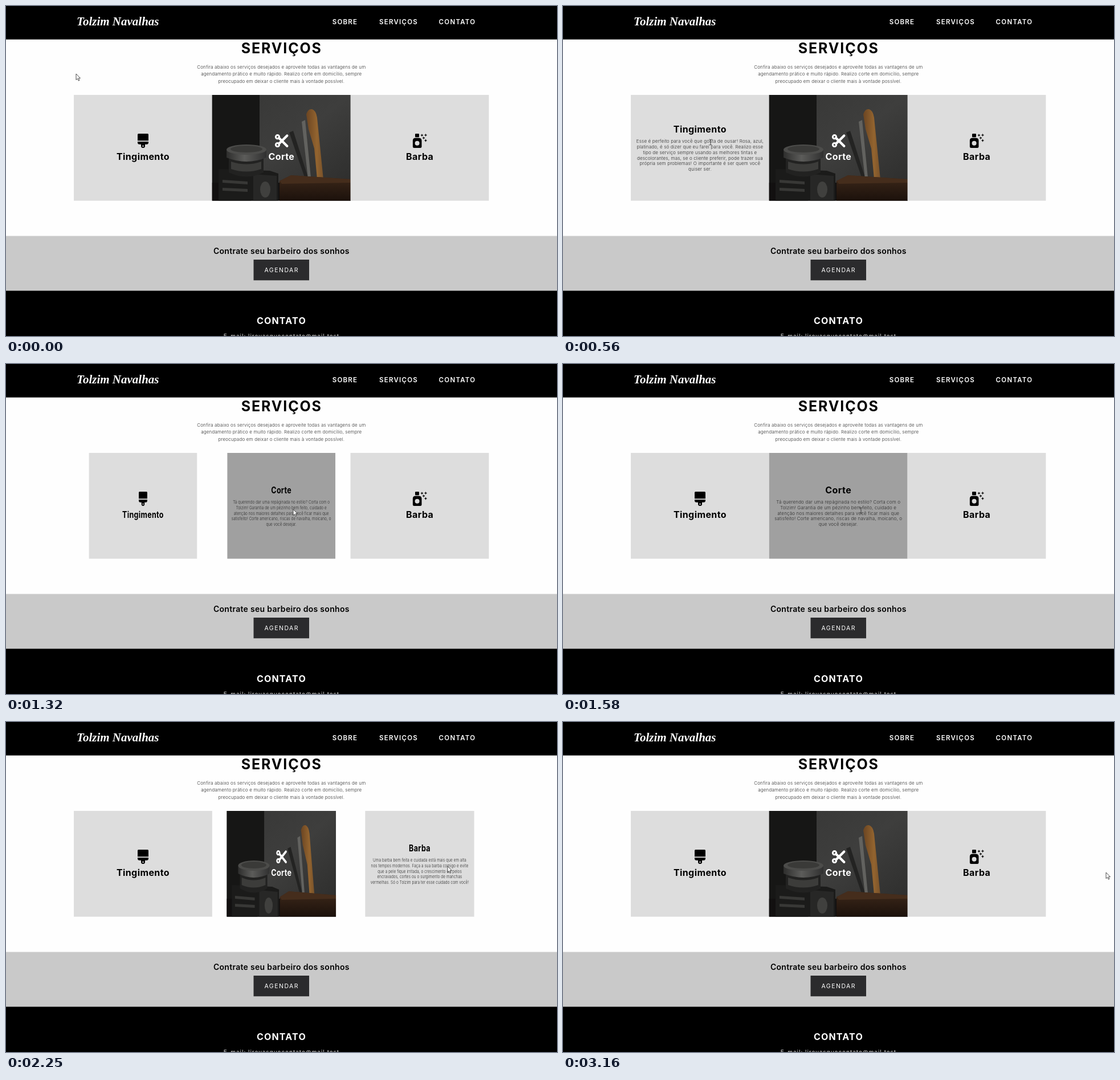
Animation of 967x579 px, one loop 3210 ms. Source, as an HTML page:

```html
<!DOCTYPE html>
<html lang="pt-BR">
<head>
<meta charset="utf-8">
<title>Serviços</title>
<style>
html, body { margin: 0; width: 100%; height: 100%; overflow: hidden; background: #fefefe; }
svg { display: block; }
#stage { width: 100vw; height: 100vh; }
text { font-family: Inter, sans-serif; text-anchor: middle; white-space: pre; }
.logo { font: italic 700 21px "Liberation Serif", serif; text-anchor: start; fill: #fff; }
.nav { font-size: 11.5px; font-weight: 600; letter-spacing: 1.25px; fill: #fff; }
.title { font-size: 25px; font-weight: 700; letter-spacing: 1.85px; }
.intro { font-size: 8px; font-weight: 300; letter-spacing: .19px; fill: #333; }
.name { font-size: 16px; font-weight: 700; letter-spacing: .42px; }
.body { font-size: 8px; font-weight: 300; letter-spacing: .17px; fill: #2c2c2c; }
.call { font-size: 14px; font-weight: 600; letter-spacing: .3px; }
.button { font-size: 10.5px; letter-spacing: 1.5px; fill: #fff; }
.contact { font-size: 16px; font-weight: 700; letter-spacing: 1.2px; fill: #fff; }
.mail { font-size: 10px; letter-spacing: .98px; fill: #ddd; }
</style>
</head>
<body>
<svg id="stage" viewBox="0 0 967 579" preserveAspectRatio="none">
  <defs>
    <linearGradient id="wall" x1="0" y1="0" x2="1" y2="1">
      <stop offset="0" stop-color="#363635"/>
      <stop offset=".5" stop-color="#3e3e3d"/>
      <stop offset="1" stop-color="#2b2b2a"/>
    </linearGradient>
    <linearGradient id="metal">
      <stop offset="0" stop-color="#2e2e2d"/>
      <stop offset=".45" stop-color="#5c5c5a"/>
      <stop offset="1" stop-color="#303030"/>
    </linearGradient>
    <linearGradient id="wood" x1="0" y1="0" x2="0" y2="1">
      <stop offset="0" stop-color="#3d281a"/>
      <stop offset="1" stop-color="#1b110b"/>
    </linearGradient>
    <linearGradient id="handle">
      <stop offset="0" stop-color="#6b4522"/>
      <stop offset=".6" stop-color="#93642f"/>
      <stop offset="1" stop-color="#75502a"/>
    </linearGradient>
    <path id="spark" d="M0-2.8L.8-.8 2.8 0 .8.8 0 2.8-.8.8-2.8 0-.8-.8z"/>
  </defs>

  <rect width="967" height="579" fill="#fefefe"/>
  <rect width="967" height="58.7" fill="#000"/>
  <text class="logo" x="124" y="34">Tolzim Navalhas</text>
  <text class="nav" x="595" y="31.8">SOBRE</text>
  <text class="nav" x="689" y="31.8">SERVIÇOS</text>
  <text class="nav" x="792" y="31.8">CONTATO</text>

  <text class="title" x="483.8" y="82.8">SERVIÇOS</text>
  <g id="intro"></g>

  <g class="card">
    <g class="front">
      <rect x="119" y="156" width="242.8" height="185.6" fill="#ddd"/>
      <path d="M232.5 224h16q1.5 0 1.5 1.5v10.7h-19v-10.7q0-1.5 1.5-1.5zM231 238h19v1.5q0 3.3-3.3 3.3h-2.7v2.7a3.5 3.5 0 0 1-7 0v-2.7h-2.7q-3.3 0-3.3-3.3z"/>
      <circle cx="240.5" cy="245.8" r="1.2" fill="#ddd"/>
      <text class="name" x="240.5" y="270">Tingimento</text>
    </g>
    <g class="back"></g>
  </g>

  <g class="card">
    <g class="front">
      <svg x="361.8" y="156" width="243.2" height="185.6" viewBox="361.8 156 243.2 185.6">
        <rect x="361" y="156" width="244" height="186" fill="url(#wall)"/>
        <path d="M361 156H445V250L430 342H361z" fill="#161615"/>
        <path d="M361 310H605V342H361z" fill="#121010"/>
        <path d="M373 286L463 289 478 294V342H373z" fill="#1b1b1a"/>
        <path d="M434 295L475 298V342H434z" fill="#272726"/>
        <path d="M380 305l44 3v5l-44-3zM380 319l44 2v5l-44-2z" fill="#383836"/>
        <ellipse cx="455" cy="322" rx="9" ry="14" fill="#40403e"/>
        <path d="M391 263H452V292Q422 307 391 292z" fill="#222221"/>
        <path d="M395 273q27 9 53 0v13q-26 9-53 0z" fill="#3c3c3a"/>
        <path d="M387 252V266Q422 280 457 266V252z" fill="url(#metal)"/>
        <ellipse cx="422" cy="252" rx="35" ry="9" fill="#4c4c4a"/>
        <ellipse cx="422" cy="251" rx="28" ry="6" fill="#3a3a38"/>
        <path d="M497 222L504 219 533 310 528 312z" fill="#232322"/>
        <path d="M519 203L525 200 536 311 531 312z" fill="#62625f"/>
        <path d="M527 190Q530 180 537 181 544 183 546 196L551 245 558 314Q553 319 547 314L541 250 531 216z" fill="url(#handle)"/>
        <path d="M480 307L500 297 605 304V342H480z" fill="url(#wood)"/>
        <path d="M480 307L500 297 605 304V310L484 312z" fill="#452d1c"/>
      </svg>
      <g fill="none" stroke="#fff">
        <circle cx="476.5" cy="229.7" r="3.1" stroke-width="3"/>
        <circle cx="476.5" cy="243.5" r="3.1" stroke-width="3"/>
        <path d="M479 231.5L493.3 245.7M479 241.7L493.3 227.5" stroke-width="4.3" stroke-linecap="round"/>
      </g>
      <text class="name" x="483.3" y="270" fill="#fff">Corte</text>
    </g>
    <g class="back"></g>
  </g>

  <g class="card">
    <g class="front">
      <rect x="604.6" y="156" width="242.8" height="185.6" fill="#ddd"/>
      <rect x="718" y="224" width="7" height="6.3" rx="1.2"/>
      <path d="M718.5 231.5h6q5 0 5 5v10.2q0 2.3-2.3 2.3h-11q-2.3 0-2.3-2.3v-10.2q0-5 4.6-5z"/>
      <circle cx="721.6" cy="240.7" r="4" fill="#ddd"/>
      <use href="#spark" x="730" y="226.8"/>
      <use href="#spark" x="736.5" y="226.5"/>
      <use href="#spark" x="733" y="231.5"/>
      <use href="#spark" x="736.5" y="236"/>
      <text class="name" x="726.2" y="270">Barba</text>
    </g>
    <g class="back"></g>
  </g>

  <rect y="403.5" width="967" height="97" fill="#c9c9c9"/>
  <text class="call" x="483.3" y="435">Contrate seu barbeiro dos sonhos</text>
  <rect x="434.5" y="445" width="97.5" height="36.3" fill="#2b2b2d"/>
  <text class="button" x="483.8" y="466.7">AGENDAR</text>
  <rect y="499.6" width="967" height="79.4" fill="#000"/>
  <text class="contact" x="483.4" y="558">CONTATO</text>
  <text class="mail" x="483.4" y="583">E-mail: lirovasquecontato@mail.test</text>

  <g id="pointer">
    <path id="arrow" d="M0 0V10.6L2.5 8.4 4.2 12.2 5.9 11.4 4.3 7.7H7.4z" fill="#fff" stroke="#222" stroke-width=".8"/>
    <path id="beam" d="M-2.5-5Q0-5 0-4V4Q0 5-2.5 5M2.5-5Q0-5 0-4M0 4Q0 5 2.5 5" fill="none" stroke="#333" stroke-width=".9"/>
  </g>
</svg>

<script>
const LOOP = 3210, FLIP = 300;

// The picture only refreshes at these times (ms).
const TICKS = [0, 70, 140, 210, 280, 350, 420, 490, 560,
  960, 1030, 1100, 1170, 1240, 1300, 1370, 1440,
  1860, 1930, 1990, 2060, 2120, 2200, 2260, 2320,
  2460, 2530, 2600, 2670, 2740, 2810, 2880, 2950, 3020, 3090, 3160];

// Pointer path: time, x, y
const PATH = [[0, 123, 119], [70, 128, 123], [250, 178, 157], [420, 246, 224],
  [560, 259, 239], [890, 259, 239], [1030, 300, 241], [1155, 405, 243],
  [1170, 429, 244], [1300, 504, 255], [1440, 523, 257], [1790, 523, 257],
  [1930, 555, 255], [2054, 680, 250], [2120, 751, 249], [2200, 775, 253],
  [2320, 788, 256], [2460, 788, 256], [2740, 795, 256], [2810, 858, 259],
  [2950, 936, 264], [3160, 953, 264]];

// Spans in which the pointer rests over text
const BEAM = [[490, 1100], [1370, 1990], [2260, 2810]];

const CARDS = [
  { x: 240.4, on: 250, off: 1155, fill: '#ddd', name: 'Tingimento', top: 222, lines: [
    'Esse é perfeito para você que gosta de ousar! Rosa, azul,',
    'platinado, é só dizer que eu farei para você. Realizo esse',
    'tipo de serviço sempre usando as melhores tintas e',
    'descolorantes, mas, se o cliente preferir, pode trazer sua',
    'própria sem problemas! O importante é ser quem você',
    'quiser ser.'] },
  { x: 483.2, on: 1155, off: 2054, fill: '#a0a0a0', name: 'Corte', top: 227, lines: [
    'Tá querendo dar uma repáginada no estilo? Corta com o',
    'Tolzim! Garantia de um pézinho bem feito, cuidado e',
    'atenção nos maiores detalhes para você ficar mais que',
    'satisfeito! Corte americano, riscas de navalha, moicano, o',
    'que você desejar.'] },
  { x: 726, on: 2054, off: 2790, fill: '#ddd', name: 'Barba', top: 227, lines: [
    'Uma barba bem feita e cuidada está mais que em alta',
    'nos tempos modernos. Faça a sua barba comigo e evite',
    'que a pele fique irritada, o crescimento de pelos',
    'encravados, cortes ou o surgimento de manchas',
    'vermelhas. Só o Tolzim para ter esse cuidado com você!'] }
];

const $ = id => document.getElementById(id);
const show = (el, on) => el.setAttribute('visibility', on ? 'visible' : 'hidden');
const textLines = (cls, x, y, step, lines) => lines.map((line, i) =>
  `<text class="${cls}" x="${x}" y="${y + i * step}">${line}</text>`).join('');

$('intro').innerHTML = textLines('intro', 483.3, 110, 12.4, [
  'Confira abaixo os serviços desejados e aproveite todas as vantagens de um',
  'agendamento prático e muito rápido. Realizo corte em domicílio, sempre',
  'preocupado em deixar o cliente mais à vontade possível.']);

document.querySelectorAll('.card').forEach((el, i) => {
  const card = CARDS[i];
  card.el = el;
  card.front = el.querySelector('.front');
  card.back = el.querySelector('.back');
  card.back.innerHTML =
    `<rect x="${card.x - 121.4}" y="156" width="242.8" height="185.6" fill="${card.fill}"/>` +
    textLines('name', card.x, card.top, 0, [card.name]) +
    textLines('body', card.x, card.top + 17.8, 9.9, card.lines);
});

// CSS "ease": cubic-bezier(.25, .1, .25, 1)
function ease(p) {
  if (p <= 0) return 0;
  if (p >= 1) return 1;
  const curve = (s, a, b) => 3 * (1 - s) ** 2 * s * a + 3 * (1 - s) * s * s * b + s ** 3;
  let lo = 0, hi = 1;
  for (let i = 0; i < 24; i++) {
    const mid = (lo + hi) / 2;
    if (curve(mid, .25, .25) < p) lo = mid; else hi = mid;
  }
  return curve(lo, .1, 1);
}

function pointerAt(t) {
  const i = PATH.findIndex(p => p[0] > t);
  if (i < 0) return PATH[PATH.length - 1].slice(1);
  const [t0, x0, y0] = PATH[i - 1], [t1, x1, y1] = PATH[i];
  const k = (t - t0) / (t1 - t0);
  return [x0 + (x1 - x0) * k, y0 + (y1 - y0) * k];
}

function draw(now) {
  const time = now % LOOP;
  const t = TICKS.filter(tick => tick <= time).pop();

  for (const c of CARDS) {
    const turn = ease((t - c.on) / FLIP) - ease((t - c.off) / FLIP);
    const scale = Math.abs(Math.cos(turn * Math.PI));
    c.el.setAttribute('transform', `translate(${c.x} 0) scale(${scale} 1) translate(${-c.x} 0)`);
    show(c.front, turn < .5);
    show(c.back, turn >= .5);
  }

  const overText = BEAM.some(([from, to]) => t >= from && t < to);
  $('pointer').setAttribute('transform', `translate(${pointerAt(t)})`);
  show($('arrow'), !overText);
  show($('beam'), overText);
}

const start = performance.now();
function loop() {
  draw(Math.max(0, performance.now() - start));
  requestAnimationFrame(loop);
}
loop();
</script>
</body>
</html>
```
